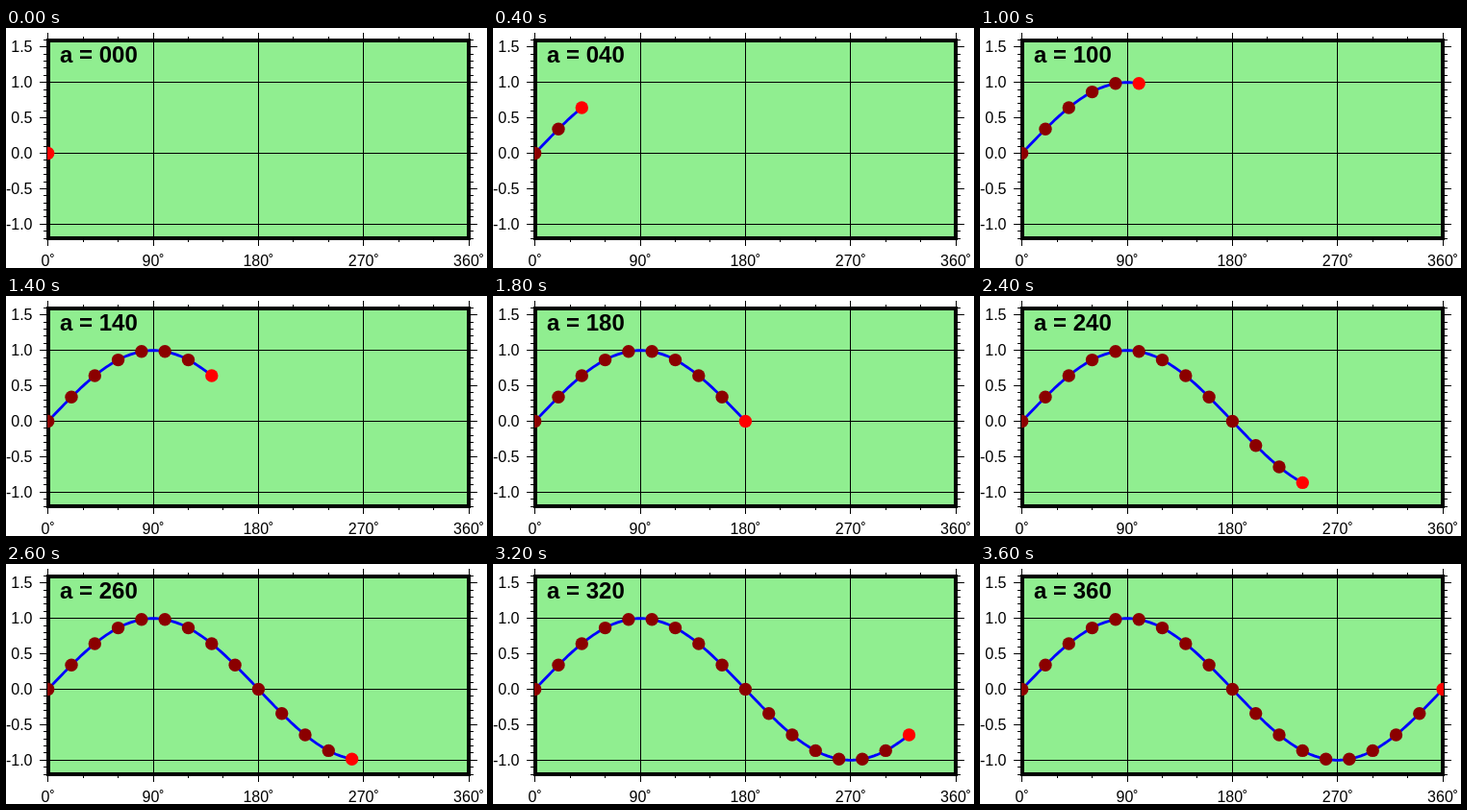
Recreate the animation shown at these times as an HTML page. Size 500x250 px, loop 3.8 s.

```html
<!DOCTYPE html>
<html lang="en">
<head>
<meta charset="utf-8">
<title>Sine curve</title>
<style>
  html, body { margin: 0; width: 100%; height: 100%; overflow: hidden; background: #fff; }
  svg { display: block; width: 500px; height: 250px; }
  text { font: 16px "Liberation Sans", Arial, sans-serif; }
  #angle { font-size: 24px; font-weight: bold; }
  .crisp { shape-rendering: crispEdges; }
  #axes line { stroke: #000; stroke-width: 1; }
  #curve { fill: none; stroke: #00f; stroke-width: 2.8; stroke-linejoin: round; }
</style>
</head>
<body>
<svg viewBox="0 0 500 250">
  <clipPath id="inside"><rect x="43" y="12" width="439" height="208"/></clipPath>
  <rect class="crisp" x="44" y="13" width="437" height="206" fill="#90ee90"/>
  <g id="axes" class="crisp"></g>
  <rect class="crisp" x="44" y="13" width="437" height="206" fill="none" stroke="#000" stroke-width="4"/>
  <g id="labels"></g>
  <g clip-path="url(#inside)">
    <path id="curve"/>
    <g id="dots"></g>
  </g>
  <text id="angle" x="56" y="36" xml:space="preserve"></text>
</svg>
<script>
const STEP = 20, FRAME_MS = 200, FRAMES = 19;
const byId = id => document.getElementById(id);
const px = deg => 43.7 + deg * 437.4 / 360;
const py = value => 130.5 - value * 73.8;
const sinY = deg => py(Math.sin(deg * Math.PI / 180));
const snap = v => Math.floor(v) + 0.5;

function add(parent, tag, attrs, content = '') {
  const node = document.createElementNS('http://www.w3.org/2000/svg', tag);
  for (const key in attrs) node.setAttribute(key, attrs[key]);
  node.textContent = content;
  byId(parent).append(node);
  return node;
}
const line = (x1, y1, x2, y2) => add('axes', 'line', { x1, y1, x2, y2 });
const label = (x, y, anchor, content) =>
  add('labels', 'text', { x, y, 'text-anchor': anchor }, content);

for (let deg = 0; deg <= 360; deg += 30) {
  const x = snap(px(deg)), major = deg % 90 === 0, len = major ? 8 : 4;
  line(x, 13 - len, x, 13);
  line(x, 219, x, 219 + len);
  if (major) {
    line(x, 13, x, 219);
    label(px(deg), 248, 'middle', deg + '˚');
  }
}
for (let tenth = -12; tenth <= 16; tenth++) {
  const y = snap(py(tenth / 10)), major = tenth % 5 === 0, len = major ? 8 : 4;
  line(43 - len, y, 43, y);
  line(482, y, 482 + len, y);
  if (tenth % 10 === 0) line(43, y, 482, y);
  if (major) label(27.5, y + 5.5, 'end', (tenth / 10).toFixed(1));
}

const dots = Array.from({ length: FRAMES }, (_, i) =>
  add('dots', 'circle', { cx: px(i * STEP), cy: sinY(i * STEP), r: 6.7 }));

let shown = -1;
function show(index) {
  const angle = index * STEP;
  const points = [];
  for (let deg = 0; deg <= angle; deg += 2) points.push(px(deg).toFixed(2) + ' ' + sinY(deg).toFixed(2));
  byId('curve').setAttribute('d', index ? 'M' + points.join('L') : '');
  dots.forEach((dot, i) => {
    dot.setAttribute('visibility', i <= index ? 'visible' : 'hidden');
    dot.setAttribute('fill', i === index ? '#f00' : '#8b0000');
  });
  byId('angle').textContent = 'a = ' + String(angle).padStart(3, '0');
}
function tick() {
  const index = Math.floor(performance.now() / FRAME_MS) % FRAMES;
  if (index !== shown) show(shown = index);
  requestAnimationFrame(tick);
}
tick();
</script>
</body>
</html>
```
